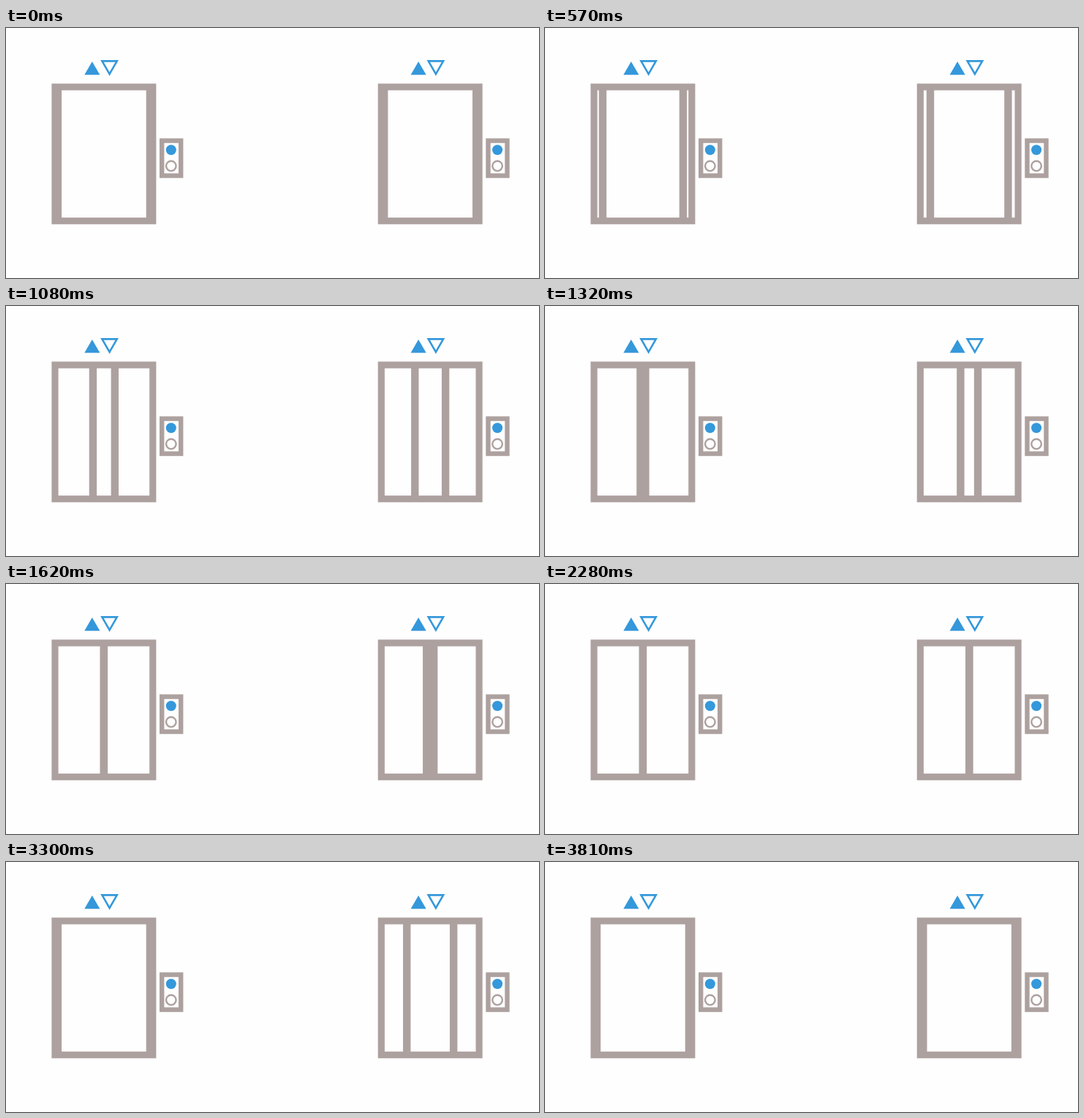
Animation of 729x343 px, one loop 4230 ms. Source, as an HTML page:

```html
<!DOCTYPE html>
<html lang="en">
<head>
<meta charset="utf-8">
<title>Elevator doors</title>
<style>
  html, body { margin: 0; width: 100%; height: 100%; overflow: hidden; background: #fefefe; }
  svg { display: block; }
</style>
</head>
<body>
<svg width="729" height="343" viewBox="0 0 729 343">
  <defs>
    <g id="shell" fill="none" stroke="#ada19f">
      <rect x="67" y="80.9" width="133.8" height="183.8" stroke-width="9.2"/>
      <rect x="213.2" y="154.6" width="26" height="48" stroke-width="6.4"/>
      <circle cx="225.8" cy="189.3" r="6.8" stroke-width="2.4"/>
      <circle cx="225.8" cy="167.3" r="7" fill="#3498db" stroke="none"/>
      <path d="M107.3 64.3h21.1L117.8 46z" fill="#3498db" stroke="none"/>
      <path d="M131.4 45.4h20.4L141.6 63.2z" stroke="#3498db" stroke-width="2.6"/>
    </g>
    <rect id="edge" x="128.7" y="81" width="10.4" height="183" fill="#ada19f"/>
  </defs>
  <g class="lift"><use href="#edge"/><use href="#edge"/><use href="#shell"/></g>
  <g class="lift" transform="translate(446.3)"><use href="#edge"/><use href="#edge"/><use href="#shell"/></g>
</svg>
<script>
const LOOP = 4230, STEP = 30, TRAVEL = 63;

// Cubic Bezier easing through (0,0), (x1,y1), (x2,y2), (1,1).
function bezier(x1, y1, x2, y2) {
  const at = (s, a, b) => 3 * s * (1 - s) ** 2 * a + 3 * s * s * (1 - s) * b + s ** 3;
  return x => {
    if (x <= 0 || x >= 1) return x <= 0 ? 0 : 1;
    let low = 0, high = 1;
    for (let i = 0; i < 24; i++) {
      const mid = (low + high) / 2;
      if (at(mid, x1, x2) < x) low = mid; else high = mid;
    }
    return at(low, y1, y2);
  };
}

const move = (start, duration, ease) => t => ease((t - start) / duration);

const doors = [
  {
    close: move(270, 1300, bezier(.4, 0, .5, 1)),
    open: move(2605, 600, bezier(.42, 0, .58, 1))
  },
  {
    close: move(300, 2000, bezier(.25, .1, .25, 1)),
    open: move(2605, 1240, bezier(.5, 0, .65, 1))
  }
];
const lifts = document.querySelectorAll('.lift');
const origin = performance.now();

function draw() {
  const elapsed = (performance.now() - origin) % LOOP;
  const t = Math.floor(elapsed / STEP) * STEP;
  doors.forEach(({ close, open }, i) => {
    const gap = TRAVEL * (1 - close(t) + open(t));
    const [left, right] = lifts[i].children;
    left.setAttribute('x', -gap);
    right.setAttribute('x', gap);
  });
  requestAnimationFrame(draw);
}
draw();
</script>
</body>
</html>
```
